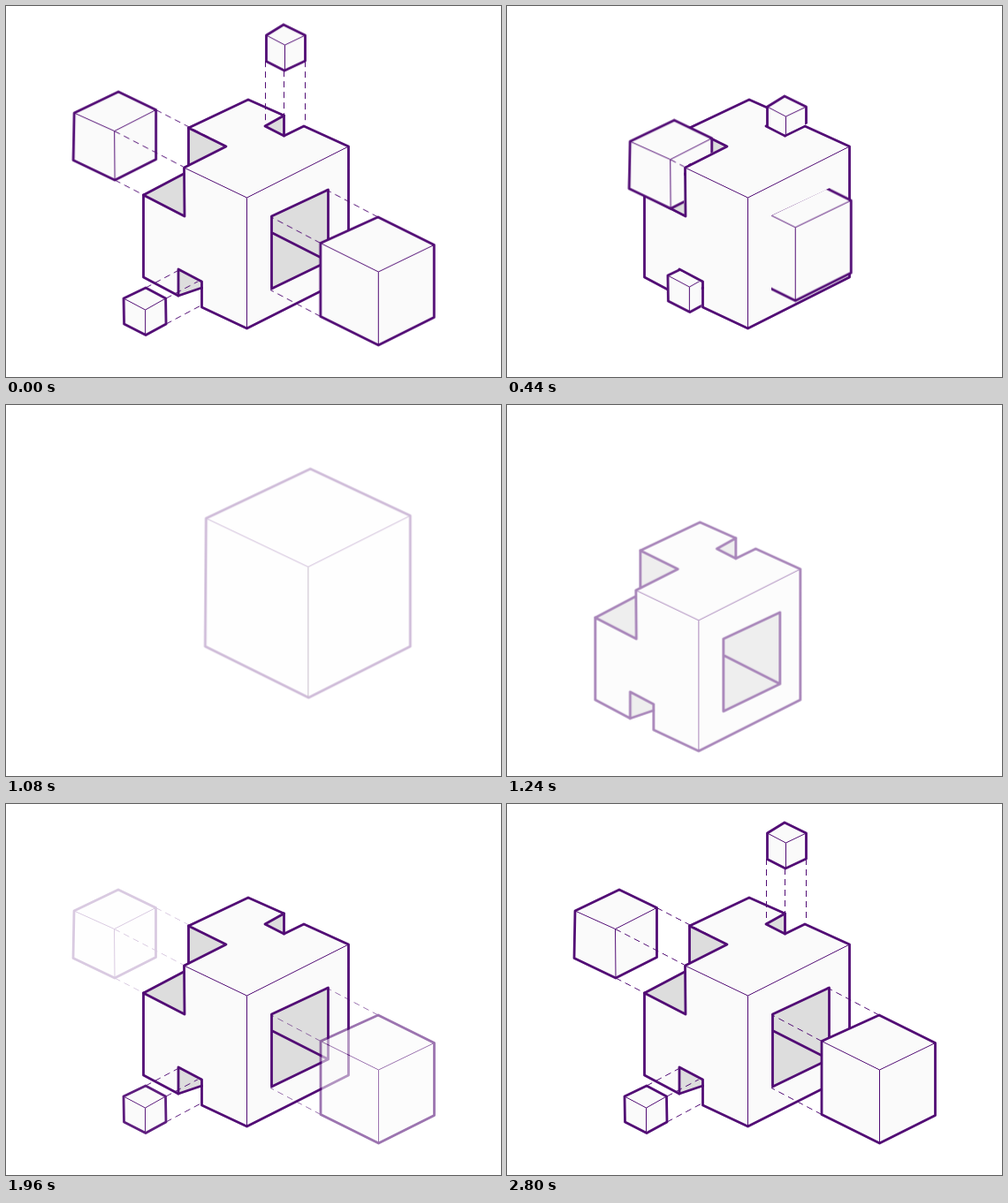
An HTML page that plays this animation: 560 by 420 pixels, repeating every 3000 ms.

```html
<!DOCTYPE html>
<html lang="en">
<head>
<meta charset="utf-8">
<title>Cube assembly</title>
<style>
html, body { margin: 0; width: 100%; height: 100%; overflow: hidden; background: #fff; }
svg { display: block; width: 560px; height: 420px; }

.body { fill: #fafafa; }
.hole { fill: #ddd; }
.edge { fill: none; stroke: #520d75; stroke-width: 2.8; stroke-linejoin: round; stroke-linecap: round; }
.fine, .guide { fill: none; stroke: #520d75; stroke-width: 1; }
.guide { stroke-dasharray: 7 5; }
.dark { stroke: #3b1a4a; }

.solid, .frame, .move, .fade { animation: 3s linear infinite; }
.solid { animation-name: solid; }
.frame { animation-name: frame; }
.move { animation-name: move; }
.left { --x: 79px; --y: 41px; animation-name: fade-left; }
.top { --x: 0px; --y: 103px; animation-name: fade-top; }
.corner { --x: 62px; --y: -33px; animation-name: fade-corner; }
.right { --x: -121px; --y: -64px; animation-name: fade-right; }

/* pieces slide into their notches */
@keyframes move {
  0% { transform: translate(0, 0); }
  18.667%, 19.99% { transform: translate(var(--x), var(--y)); }
  20%, 100% { transform: translate(0, 0); }
}

/* the finished cube leaves up and right */
@keyframes solid {
  0%, 19.99% { opacity: 0; transform: none; }
  20%, 29.333% { opacity: 1; transform: translate(0, 0); }
  38.667%, 100% { opacity: 0; transform: translate(98px, -47px); }
}

/* the notched cube enters from the lower left */
@keyframes frame {
  0%, 19.99% { opacity: 1; transform: translate(0, 0); }
  20%, 37.32% { opacity: 0; transform: translate(-98px, 47px); }
  37.333% { opacity: .125; transform: translate(-98px, 47px); }
  46.667%, 100% { opacity: 1; transform: translate(0, 0); }
}

@keyframes fade-corner { 0%, 19.99% { opacity: 1; } 20%, 48% { opacity: 0; } 66.667%, 100% { opacity: 1; } }
@keyframes fade-right { 0%, 19.99% { opacity: 1; } 20%, 54.667% { opacity: 0; } 73.333%, 100% { opacity: 1; } }
@keyframes fade-left { 0%, 19.99% { opacity: 1; } 20%, 61.333% { opacity: 0; } 80%, 100% { opacity: 1; } }
@keyframes fade-top { 0%, 19.99% { opacity: 1; } 20%, 69.667% { opacity: 0; } 93.333%, 100% { opacity: 1; } }
</style>
</head>
<body>
<svg viewBox="0 0 560 420">
  <defs>
    <clipPath id="clip-left"><path d="M0 0H250V157L200 181.8L200.5 300H0Z"/></clipPath>
    <clipPath id="clip-top"><path d="M280 0H350V128.3L314.5 145.5L280 127.7Z"/></clipPath>
    <clipPath id="clip-corner"><path d="M0 290H194V299L219.8 313.3V420H0Z"/></clipPath>
    <clipPath id="clip-right"><path d="M299 237.5L365 206H560V420H299Z"/></clipPath>
  </defs>

  <g class="frame">
    <path class="hole" d="M206.5 138L249 159L206.5 181Z M155.5 214L202 190V238Z M314.5 124V147L293 136Z M195 298L221.5 312V319L195 328Z"/>
    <path class="body" d="M274 106L314.5 124L293 136L314.5 147L337 136L387.5 159V307L272.5 365L221.5 341V312L195 298V328L155.5 307V214L202 238L201.5 183L249 159L206.5 138Z"/>
    <path class="hole" d="M300.5 238L364.5 208V289L300.5 320Z"/>
    <path class="fine" d="M201.5 183L272.5 217L387.5 159M272.5 217V365"/>
    <path class="edge" d="M274 106L314.5 124L293 136L314.5 147L337 136L387.5 159V307L272.5 365L221.5 341V312L195 298V328L155.5 307V214L202 238L201.5 183L249 159L206.5 138Z"/>
    <path class="edge" d="M206.5 138V180M155.5 214L201 190M314.5 124V147M195 328L221.5 319M300.5 238L364.5 208V289L300.5 320ZM300.5 256.5L364.5 289"/>
  </g>

  <g clip-path="url(#clip-left)"><g class="fade left"><g class="move">
    <path class="body edge" style="fill:#fafafa" d="M127 97L169.5 117.5V173.5L123 197L76 174.5L77 121Z"/>
    <path class="fine" d="M77 121L122.5 141.5L169.5 117.5M122.5 141.5L123 197"/>
    <path class="guide" d="M169.5 117.5l79 41M122.5 141.5l79 41M123 197l79 41"/>
  </g></g></g>

  <g clip-path="url(#clip-top)"><g class="fade top"><g class="move">
    <path class="body edge" style="fill:#fafafa" d="M314 21L338.5 33V62L315 73L294.5 62.5V33Z"/>
    <path class="fine" d="M294.5 33L315.5 44L338.5 33M315.5 44V73"/>
    <path class="guide" d="M293.5 62v103M314.5 73v103M338.5 62v103"/>
  </g></g></g>

  <g clip-path="url(#clip-corner)"><g class="fade corner"><g class="move">
    <path class="body edge" style="fill:#fafafa" d="M158 319L180.5 331L181 360L158 372.5L133.5 360L133 331Z"/>
    <path class="fine" d="M133 331L157.5 344L180.5 331M157.5 344V372"/>
    <path class="guide" d="M158 319l62 -33M181 331l62 -33M181 360l62 -33"/>
  </g></g></g>

  <g clip-path="url(#clip-right)"><g class="fade right"><g class="move">
    <path class="body edge" style="fill:#fafafa" d="M421 239L484.5 270.5V352.5L421.5 384L356 351.5V268.5Z"/>
    <path class="fine" d="M356 268.5L421.5 301L484.5 270.5M421.5 301V384"/>
    <path class="guide" d="M421 239l-121 -64M356 268.5l-121 -64M356 351.5l-121 -64"/>
  </g></g></g>

  <g class="solid">
    <path class="body edge" style="fill:#fafafa" d="M274 106L387 159V307L272 365L155 307L156 162Z"/>
    <path class="fine" d="M156 162L271.5 217L387 159"/>
    <path class="fine dark" d="M271.5 217V365"/>
  </g>
</svg>
</body>
</html>
```
